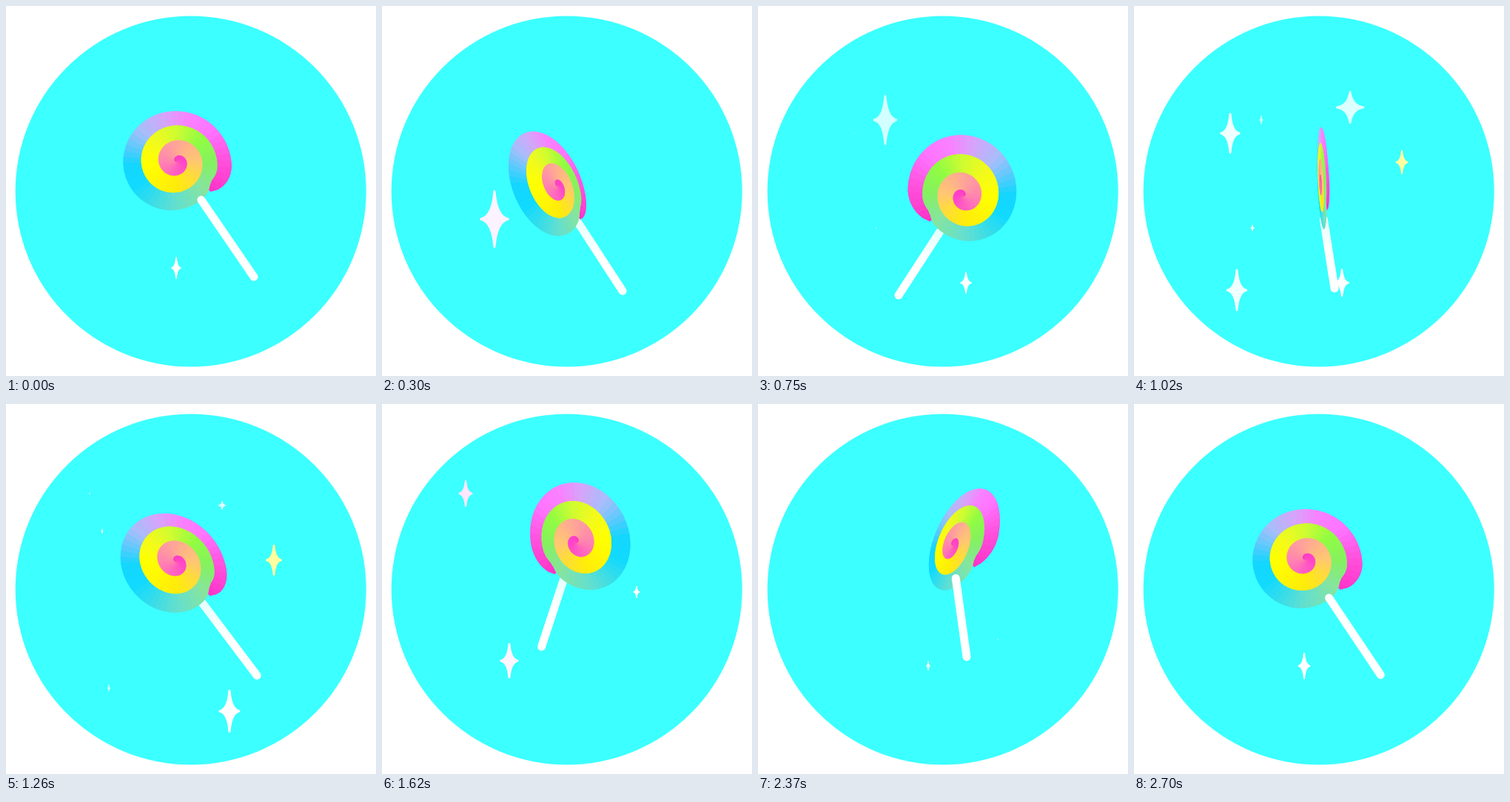
Write an HTML page with a canvas that moves like this. It is 500 by 500 pixels and loops after 2.73 s.

```html
<!DOCTYPE html>
<html lang="en">
<head>
<meta charset="utf-8">
<title>Lollipop</title>
<style>
  html, body { margin: 0; height: 100%; overflow: hidden; background: #fff; }
  canvas { display: block; width: 100vw; height: 100vh; }
</style>
</head>
<body>
<canvas id="stage" width="500" height="500"></canvas>
<script>
const LOOP = 2730;
const TAU = Math.PI * 2;
const ctx = document.getElementById('stage').getContext('2d');

// time, eye x/y, spin in degrees, x-axis y, y-axis x/y, bulge x/y, stick lean, stick top y, stick end y
const POSES = [
  [0,    231, 210, 8,   0,    0,    21.8, 4.7, 1.4,  0,   52, 156],
  [300,  237, 243, 45,  1.7,  4.4,  22.9, 4.6, 0.9,  14,  49, 142],
  [750,  277, 257, 172, -0.3, 0.6,  22.8, 4.5, -1.7, 17,  48, 134],
  [1260, 230, 213, 373, 1.1,  2,    22,   5.2, 2.4,  7,   55, 154],
  [1620, 263, 187, 515, 2.4,  5,    23.2, 3.7, -0.8, 48,  51, 141],
  [2040, 286, 175, 605, -3.8, -7.4, 21.9, 3,   -2,   -60, 41, 147],
  [2700, 231.5, 210, 724, 0,  0,    21.8, 4.7, 1.4,  -3,  52, 156]
];
const SPIN = 3;

// x, y, start time, height, width, colour
const SPARKLES = [
  [230, 354, 2330, 34, 16, '#fff'],
  [152, 288, 90,   39, 20, '#fdf2ff'],
  [172, 154, 530,  35, 17, '#d2ffff'],
  [160, 300, 715,  6,  4,  '#fff'],
  [281, 374, 660,  34, 18, '#fff'],
  [292, 137, 800,  23, 20, '#dcffff'],
  [130, 172, 745,  34, 17, '#f0ffff'],
  [139, 384, 755,  34, 17, '#f0ffff'],
  [362, 211, 920,  34, 18, '#ffffa0'],
  [302, 415, 1070, 32, 16, '#fff'],
  [113, 121, 1250, 34, 18, '#ffe6fc'],
  [172, 347, 1310, 34, 18, '#fff4ff'],
  [344, 254, 1258, 15, 9,  '#fff'],
  [186, 72,  1770, 34, 17, '#ffff66'],
  [324, 318, 1835, 34, 17, '#fdf6ff']
];
const GROW = 210, SHRINK = 340;

// turns along the ribbon, colour
const RIBBON = [
  [-0.11, 'ff2fc8'], [0, 'ff4cd8'], [0.12, 'ff74ff'], [0.2, 'fa80ff'],
  [0.28, 'd6a4fa'], [0.37, 'a9bdfa'], [0.5, '14d6ff'], [0.58, '10daff'],
  [0.75, '62dfd0'], [0.88, '86e4a0'], [1, '84f060'], [1.12, '90fc44'],
  [1.25, 'd0fc30'], [1.37, 'f2fa1c'], [1.5, 'ffff00'], [1.75, 'ffec0a'],
  [1.9, 'ffda40'], [2, 'ffc870'], [2.25, 'ffa698'], [2.5, 'ff84b0'],
  [2.75, 'ff5cc4'], [3, 'ff44cc'], [3.6, 'ff2fc4']
];

const lerp = (a, b, k) => a + (b - a) * k;

function ribbonColor(t) {
  let i = 1;
  while (i < RIBBON.length - 1 && RIBBON[i][0] < t) i++;
  const [t0, c0] = RIBBON[i - 1], [t1, c1] = RIBBON[i];
  const k = Math.min(1, Math.max(0, (t - t0) / (t1 - t0)));
  const mix = [0, 2, 4].map(n => Math.round(
    lerp(parseInt(c0.substr(n, 2), 16), parseInt(c1.substr(n, 2), 16), k)));
  return `rgb(${mix})`;
}

// Radius of the outer ribbon edge, with a rounded end and a small notch.
function radius(t) {
  if (t < 0) return 3.6 - 0.8 * (t / 0.105) ** 2;
  const notch = 0.2 * Math.exp(-(((t - 0.925) / 0.03) ** 2));
  return Math.max(0, 3.6 - t - notch);
}

const STEP = 0.02;
const SLICES = [];
for (let t = -0.105; t < 3.6; t += STEP) {
  SLICES.push({ t, color: ribbonColor(t + STEP / 2) });
}

// Pose row at any index; later laps add time and two full turns.
function row(i) {
  const n = POSES.length, lap = Math.floor(i / n);
  const r = POSES[i - lap * n].slice();
  r[0] += lap * LOOP;
  r[SPIN] += lap * 720;
  return r;
}

function poseAt(time) {
  let i = POSES.length - 1;
  while (POSES[i][0] > time) i--;
  const [a, b, c, d] = [-1, 0, 1, 2].map(n => row(i + n));
  const span = c[0] - b[0], s = (time - b[0]) / span;
  const s2 = s * s, s3 = s2 * s;
  return b.map((v, j) => {
    const m0 = (c[j] - a[j]) / (c[0] - a[0]) * span;
    const m1 = (d[j] - b[j]) / (d[0] - b[0]) * span;
    return (2 * s3 - 3 * s2 + 1) * v + (s3 - 2 * s2 + s) * m0
      + (3 * s2 - 2 * s3) * c[j] + (s3 - s2) * m1;
  });
}

function drawCandy(x, y, ax, ay, bx, by, mx, my) {
  const edge = t => {
    const r = radius(t), c = Math.cos(t * TAU), s = -Math.sin(t * TAU);
    const bulge = r / 3.1;
    ctx.lineTo(x + r * (ax * c + bx * s + mx * bulge), y + r * (ay * c + by * s + my * bulge));
  };
  for (const { t, color } of SLICES) {
    ctx.fillStyle = color;
    ctx.beginPath();
    ctx.moveTo(x, y);
    edge(t);
    edge(t + STEP);
    edge(t + STEP * 1.8);
    ctx.fill();
  }
}

function drawStick(x0, y0, x1, y1, front) {
  const shade = ctx.createLinearGradient(x0, y0, x1, y1);
  shade.addColorStop(0, front ? '#fff' : '#e6fffc');
  shade.addColorStop(0.5, '#fff');
  ctx.strokeStyle = shade;
  ctx.lineWidth = 11;
  ctx.lineCap = 'round';
  ctx.beginPath();
  ctx.moveTo(x0, y0);
  ctx.lineTo(x1, y1);
  ctx.stroke();
}

function drawSparkle(x, y, h, w, color) {
  const pen = Math.min(3, w / 4);
  h -= pen / 2;
  w -= pen / 2;
  ctx.fillStyle = ctx.strokeStyle = color;
  ctx.lineWidth = pen;
  ctx.lineJoin = 'round';
  ctx.beginPath();
  ctx.moveTo(x, y - h);
  for (const [sx, sy, ex, ey] of [[1, -1, w, 0], [1, 1, 0, h], [-1, 1, -w, 0], [-1, -1, 0, -h]]) {
    ctx.quadraticCurveTo(x + sx * w * 0.15, y + sy * h * 0.1, x + ex, y + ey);
  }
  ctx.closePath();
  ctx.fill();
  ctx.stroke();
}

function draw(time) {
  ctx.fillStyle = '#fff';
  ctx.fillRect(0, 0, 500, 500);
  ctx.fillStyle = '#3cffff';
  ctx.beginPath();
  ctx.arc(249.7, 250.5, 237, 0, TAU);
  ctx.fill();

  for (const [x, y, start, h, w, color] of SPARKLES) {
    const age = (time - start + LOOP) % LOOP;
    const k = age < GROW ? age / GROW : 1 - (age - GROW) / SHRINK;
    if (k > 0.02) drawSparkle(x, y, h * k, w * k, color);
  }

  const [, x, y, spin, ay, bx, by, bulge, my, lean, top, end] = poseAt(time);
  const angle = spin * Math.PI / 180, face = Math.cos(angle);
  const front = time > 1800 || time < 150;
  const reach = 105 * face + lean;
  const stick = () => drawStick(x + reach * 0.335 - 2, y + top, x + reach, y + end, front);
  if (!front) stick();
  drawCandy(x, y, 22.3 * face, ay, bx, by, -bulge * Math.sin(2 * angle), my);
  if (front) stick();
}

const begin = performance.now();
function tick() {
  draw((performance.now() - begin) % LOOP);
  requestAnimationFrame(tick);
}
tick();
</script>
</body>
</html>
```
